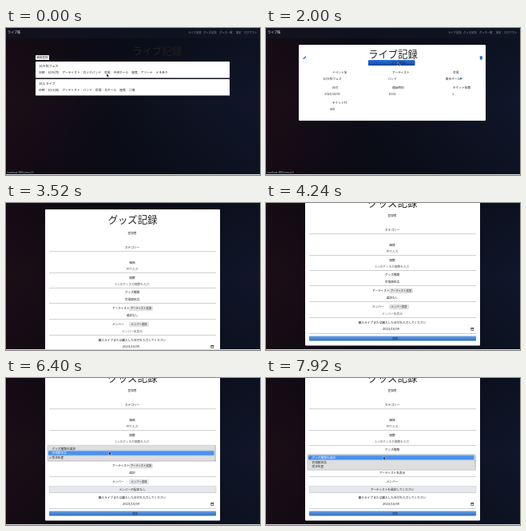
An HTML page that plays this animation: 318x184 px, repeating every 8000 ms.

```html
<!DOCTYPE html>
<html>
<head>
<meta charset="utf-8">
<title>ライブ記録</title>
<style>
html, body { margin: 0; width: 100%; height: 100%; overflow: hidden; background: #0a0d18; }
svg { display: block; width: 318px; height: 184px; }
text { font-family: "Noto Sans CJK JP", "Noto Sans CJK", "Noto Sans", sans-serif; font-size: 3.8px; fill: #222; white-space: pre; }
.step { visibility: hidden; animation: 8s step-end infinite; }

/* 1% of the loop is 80 ms */
#list { animation-name: list; }
#detail { animation-name: detail; }
#form { animation-name: form; }
#status { animation-name: status; }
#both { animation-name: both; }
#solo { animation-name: solo; }
#none { animation-name: none-chosen; }
#menu { animation-name: menu; }
#hover { animation: hover 8s step-end infinite; }
.opt0 { animation: opt0 8s step-end infinite; }
.opt1 { animation: opt1 8s step-end infinite; }
.opt2 { animation: opt2 8s step-end infinite; }
#tick { animation: tick 8s step-end infinite; }
#scroll { animation: scroll 8s linear infinite; }
#cursor { animation: move 8s ease-in-out infinite, pointer 8s step-end infinite; }

@keyframes list { 0% { visibility: visible } 7% { visibility: hidden } }
@keyframes detail { 0% { visibility: hidden } 7% { visibility: visible } 28% { visibility: hidden } }
@keyframes form { 0% { visibility: hidden } 28%, 100% { visibility: visible } }
@keyframes status { 0% { visibility: visible } 13% { visibility: hidden } 20% { visibility: visible } 28% { visibility: hidden } }
@keyframes both { 0% { visibility: hidden } 28% { visibility: visible } 67% { visibility: hidden } }
@keyframes solo { 0% { visibility: hidden } 67% { visibility: visible } 91% { visibility: hidden } }
@keyframes none-chosen { 0% { visibility: hidden } 91%, 100% { visibility: visible } }
@keyframes menu {
  0% { visibility: hidden; transform: translateY(89.6px) }
  55% { visibility: visible; transform: translateY(89.6px) }
  67% { visibility: hidden; transform: translateY(84px) }
  73% { visibility: visible; transform: translateY(84px) }
  89% { visibility: hidden; transform: translateY(95.2px) }
  97%, 100% { visibility: visible; transform: translateY(95.2px) }
}
@keyframes hover {
  0% { transform: translateY(5.6px) }
  61% { transform: translateY(11.2px) }
  77% { transform: translateY(5.6px) }
  85%, 100% { transform: translateY(0) }
}
@keyframes opt0 { 0% { fill: #222 } 85%, 100% { fill: #fff } }
@keyframes opt1 { 0% { fill: #fff } 61% { fill: #222 } 77% { fill: #fff } 85%, 100% { fill: #222 } }
@keyframes opt2 { 0% { fill: #222 } 61% { fill: #fff } 77%, 100% { fill: #222 } }
@keyframes tick {
  0% { transform: translateY(5.6px) }
  67% { transform: translateY(11.2px) }
  91%, 100% { transform: translateY(0) }
}
@keyframes scroll {
  0%, 40% { transform: translateY(0) }
  44% { transform: translateY(-13px) }
  48% { transform: translateY(-29px) }
  53%, 100% { transform: translateY(-35px) }
}
@keyframes move {
  0%, 6% { transform: translate(126px, 57px) }
  12% { transform: translate(128px, 57px) }
  21%, 28% { transform: translate(165px, 43px) }
  55% { transform: translate(147px, 98px) }
  64%, 67% { transform: translate(139px, 103px) }
  73% { transform: translate(133px, 99px) }
  80% { transform: translate(129px, 92px) }
  88%, 91% { transform: translate(138px, 87px) }
  97%, 100% { transform: translate(147px, 98px) }
}
@keyframes pointer { 0% { visibility: visible } 34% { visibility: hidden } 55%, 100% { visibility: visible } }
</style>
</head>
<body>
<svg viewBox="0 0 318 184">
  <defs>
    <linearGradient id="night">
      <stop offset="0" stop-color="#1d0d15"/>
      <stop offset=".4" stop-color="#0c0d18"/>
      <stop offset="1" stop-color="#10172a"/>
    </linearGradient>
    <linearGradient id="shade" x2="0" y2="1">
      <stop offset="0" stop-color="#05070f" stop-opacity=".35"/>
      <stop offset=".5" stop-color="#05070f" stop-opacity="0"/>
      <stop offset="1" stop-color="#05070f" stop-opacity=".3"/>
    </linearGradient>
    <linearGradient id="blue" x2="0" y2="1">
      <stop offset="0" stop-color="#6a9fe0"/>
      <stop offset="1" stop-color="#2f6fc4"/>
    </linearGradient>
    <linearGradient id="deep" x2="0" y2="1">
      <stop offset="0" stop-color="#2f73d6"/>
      <stop offset="1" stop-color="#0b45a5"/>
    </linearGradient>
  </defs>
  <rect width="318" height="184" fill="url(#night)"/>
  <rect width="318" height="184" fill="url(#shade)"/>
  <g id="scroll">
    <g id="nav"></g>
    <g id="list" class="step"></g>
    <g id="detail" class="step"></g>
    <g id="form" class="step"></g>
    <g id="both" class="step"></g>
    <g id="solo" class="step"></g>
    <g id="none" class="step"></g>
  </g>
  <g id="menu" class="step"></g>
  <g id="status" class="step"></g>
  <rect y="183" width="318" height="1" fill="#d9dade"/>
  <path id="cursor" d="M0 0V4.6L1.1 3.6 1.9 5.3 2.7 4.9 1.9 3.3H3.3Z" fill="#111" stroke="#fff" stroke-width=".4"/>
</svg>
<script>
const NS = 'http://www.w3.org/2000/svg';
const SCROLL = 35;

function add(group, tag, attrs, label) {
  const el = document.createElementNS(NS, tag);
  for (const k in attrs) el.setAttribute(k, attrs[k]);
  if (label) el.textContent = label;
  document.getElementById(group).append(el);
  return el;
}
const box = (g, x, y, width, height, fill, more) => add(g, 'rect', { x, y, width, height, fill, ...more });
// y is the middle of the line
const left = (g, x, y, label, size = 3.8, style = '') =>
  add(g, 'text', { x, y: y + size * .37, style: `font-size:${size}px;${style}` }, label);
const mid = (g, x, y, label, size, style = '') => left(g, x, y, label, size, style + 'text-anchor:middle');

// Navigation
box('nav', 0, 0, 318, 13, '#131826', { opacity: .6 });
left('nav', 2, 6, 'ライブ帳', 4, 'fill:#e8e8ee');
[[228, 'ライブ記録'], [247, 'グッズ記録'], [267, 'グッズ一覧'], [288, '設定'], [298, 'ログアウト']]
  .forEach(([x, s]) => left('nav', x, 6, s, 3.3, 'fill:#8d93a3'));

// Live list
mid('list', 158.5, 29.5, 'ライブ記録', 12.3, 'fill:#fff');
box('list', 37, 34, 17, 6, '#f4f4f4', { rx: .6 });
mid('list', 45.5, 37, '新規登録', 3.4);
[[42, '10/9 秋フェス', '日時：10/9(月)　アーティスト：ロックバンド　会場：中央ホール　座席：アリーナ　メモあり'],
 [64, '10/1 ライブ', '日時：10/1(日)　アーティスト：バンド　会場：北ホール　座席：二階']]
  .forEach(([y, title, info]) => {
    box('list', 37, y, 243, 20.5, '#fff', { rx: .6 });
    left('list', 41, y + 5.5, title, 3.9);
    left('list', 41, y + 13.3, info, 3.8);
  });

// Live detail
box('detail', 41, 21, 234, 95, '#fff', { rx: 1 });
mid('detail', 159, 33, 'ライブ記録', 12.3);
box('detail', 128, 40, 58.5, 7, 'url(#deep)', { rx: 1 });
mid('detail', 157, 43.5, 'グッズ登録', 3.5, 'fill:#fff');
add('detail', 'path', { d: 'M46.3 39.2l.5-1.5 2.6-2.5 1 1-2.6 2.5Z', fill: '#1766d1' });
add('detail', 'path', { d: 'M267.6 35.4h3.4M268 36h2.6l-.3 3.2h-2Z', fill: '#1766d1', stroke: '#1766d1', 'stroke-width': .6 });
[[83, 56, 'イベント名', '10/9 秋フェス'], [158, 56, 'アーティスト', 'バンド'], [234, 56, '会場', '東京ホール'],
 [83, 75, '日付', '2023/10/09'], [158, 75, '開始時刻', '10:00'], [234, 75, 'チケット枚数', '1'],
 [83, 94, 'チケット代', '500']]
  .forEach(([x, y, name, value]) => {
    mid('detail', x, y, name, 3.7, 'fill:#444');
    mid('detail', x, y + 7.4, value, 3.7);
  });
add('detail', 'circle', { cx: 244, cy: 63.3, r: 1.2, fill: '#2c7a8c' });

// Goods form, laid out as seen when scrolled down
const row = y => y + SCROLL;
const line = (g, y) => box(g, 54, row(y), 209, .6, '#aeb1b6');
const center = (g, y, s, style) => mid(g, 158, row(y), s, 3.7, style);
const grey = 'fill:#555;';
box('form', 49, row(-14), 219, 192.5, '#fff', { rx: 1 });
mid('form', 158.5, row(0), 'グッズ記録', 12.3);
center('form', 15.5, '登録者');
center('form', 34, 'カテゴリー');
center('form', 53, '価格');
center('form', 61, '円で入力', grey);
center('form', 71.5, '個数');
center('form', 80, '1つのグッズの個数を入力', grey);
center('form', 90, 'グッズ種類');
center('form', 149.3, '購入ライブまたは購入した日付を入力してください');
mid('form', 156.5, row(158), '2023/10/09', 4);
[38.5, 65, 84, 103.3, 123, 143, 163].forEach(y => line('form', y));
box('form', 256.8, row(156.6), 3, 3, 'none', { stroke: '#222', 'stroke-width': .6 });
box('form', 256.8, row(156.4), 3, 1, '#222');
box('form', 54, row(166.5), 209, 6, 'url(#blue)', { rx: .8 });
mid('form', 158, row(169.5), '登録', 3.4, 'fill:#fff');

function field(g, y, name, button, width) {
  left(g, button ? 133 : 152, row(y), name, 3.7);
  if (!button) return;
  box(g, 154.5, row(y - 2.9), width, 5.8, '#e3e3e5', { rx: 1, stroke: '#c4c4c8', 'stroke-width': .3 });
  mid(g, 154.5 + width / 2, row(y), button, 3.3);
}
function disabled(g, s) {
  box(g, 54, row(135.5), 209, 8, '#e5e8ec', { stroke: '#b9bdc4', 'stroke-width': .4 });
  center(g, 139.4, s);
}
const options = ['グッズ種類を選択', '会場限定品', '受注生産'];

center('both', 99, options[1]);
field('both', 110, 'アーティスト', 'アーティスト追加', 29);
center('both', 119, '選択なし');
field('both', 130, 'メンバー', 'メンバー追加', 24);
center('both', 139, 'メンバー名表示', grey);

center('solo', 99, options[2]);
field('solo', 110, 'アーティスト', 'アーティスト追加', 29);
center('solo', 119, '選択');
field('solo', 130, 'メンバー', 'メンバー追加', 24);
disabled('solo', 'メンバーの指定なし');

center('none', 99, options[0]);
center('none', 110, 'アーティスト');
center('none', 119, 'アーティスト名表示');
center('none', 129.5, 'メンバー');
disabled('none', 'アーティストを選択してください');

// Drop-down menu
box('menu', 51.6, .6, 211.4, 20, '#000', { opacity: .18, rx: 1.5 });
box('menu', 52, 0, 209.5, 19.8, '#dededf', { rx: 1.3, stroke: '#aaa', 'stroke-width': .3 });
box('menu', 53, 1.6, 207.5, 5.6, '#4a90ee', { id: 'hover', rx: .8 });
options.forEach((s, i) => left('menu', 57.5, 4.4 + i * 5.6, s, 3.7).classList.add('opt' + i));
add('menu', 'path', { id: 'tick', d: 'M54.2 4.5l.8 1 1.3-2.2', fill: 'none', stroke: '#222', 'stroke-width': .5 });

// Link preview
box('status', 0, 179, 38, 4.2, '#05060a');
left('status', 1, 181, 'localhost:3000/lives/10', 3.1, 'fill:#d5d5d8');
</script>
</body>
</html>
```
